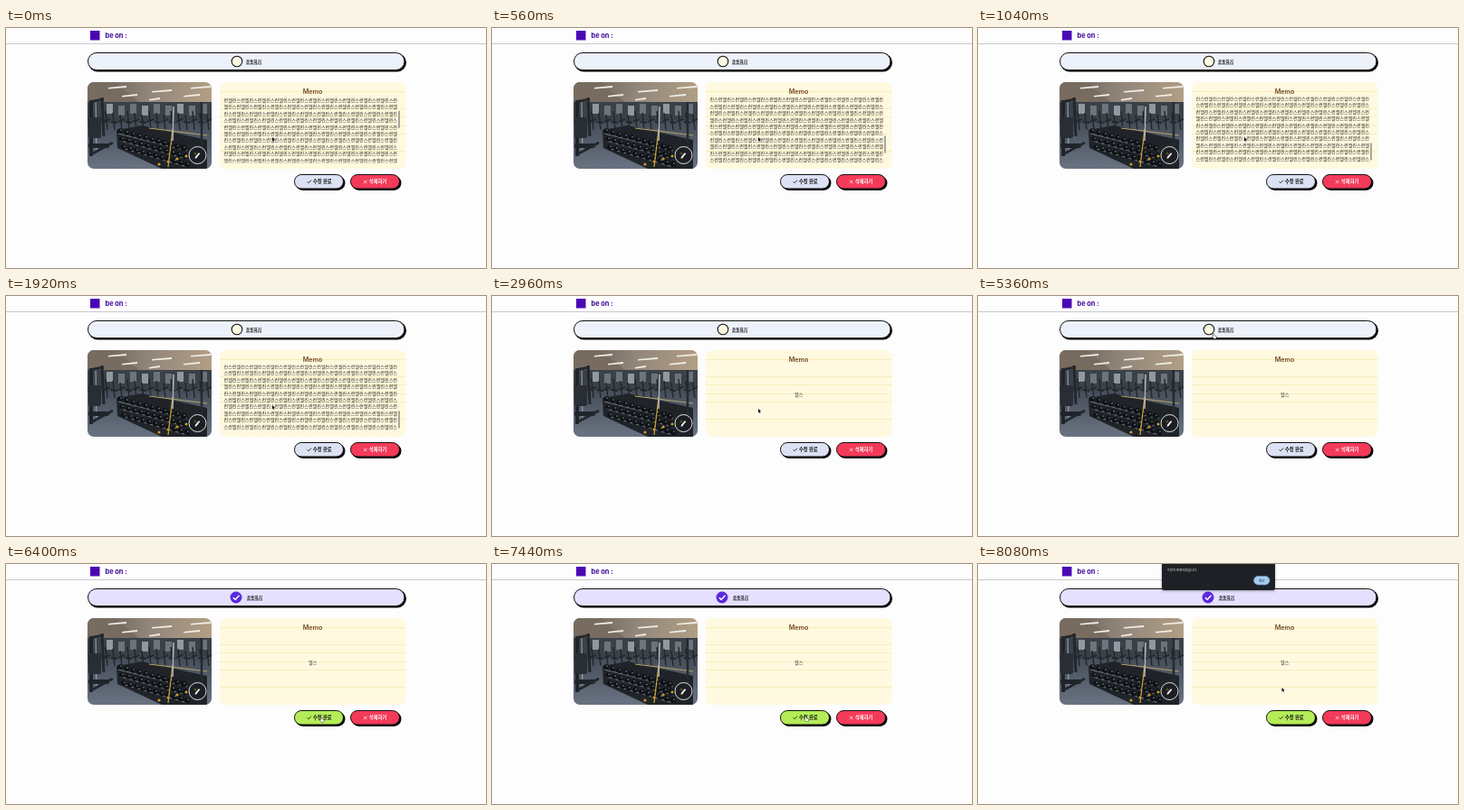
These frames come from a looping animation (530x266 px, 8.16 s). An HTML page with a canvas:

```html
<!DOCTYPE html>
<html lang="ko">
<head>
<meta charset="utf-8">
<title>Workout memo</title>
<style>
html, body { margin: 0; width: 100%; height: 100%; overflow: hidden; background: #fdfdfd; }
canvas { display: block; width: 530px; height: 266px; }
</style>
</head>
<body>
<canvas id="stage"></canvas>
<script>
const W = 530, H = 266, LOOP = 8160, STEP = 80;
const canvas = document.getElementById('stage');
const dpr = window.devicePixelRatio || 1;
canvas.width = W * dpr;
canvas.height = H * dpr;
const ctx = canvas.getContext('2d');
const SANS = '"Noto Sans CJK KR", "Noto Sans CJK", "Noto Sans", sans-serif';

const ROWS = 36, PER_ROW = 41, PITCH = 7.4;
const WORD = '런헬린스';
const rows = Array.from({ length: ROWS }, (_, r) =>
  Array.from({ length: PER_ROW }, (_, i) => WORD[(r * PER_ROW + i) % WORD.length]).join(''));

// Keys are [time, value, ...]; values ease between neighbouring keys.
const SCROLL = [[0, 60], [560, 164.1], [880, 195.1]];
const POINTER = [
  [0, 294, 121], [1920, 294, 121], [2800, 294, 125], [4240, 294, 125],
  [5200, 259, 42], [5680, 259, 42], [6160, 347, 170], [7920, 345, 169],
  [8080, 335.5, 137]
];
const TYPING = [[2480, ''], [2560, 'ㅎ'], [2640, '헤'], [2720, '헬'], [2800, '헬ㅅ'], [2880, '헬스']];
const CLEAR_AT = 2400, CHECK_AT = 5520, HOVER_AT = 6080, ALERT_AT = 7600;

function track(keys, t, ease = u => u) {
  for (let i = 1; i < keys.length; i++) {
    const [a, ...from] = keys[i - 1], [b, ...to] = keys[i];
    if (t <= b) {
      const u = ease((t - a) / (b - a));
      return from.map((v, k) => v + (to[k] - v) * u);
    }
  }
  return keys[keys.length - 1].slice(1);
}
const smooth = u => u * u * (3 - 2 * u);

function box(x, y, w, h, r, fill, stroke, lw = 1) {
  ctx.beginPath();
  ctx.roundRect(x, y, w, h, r);
  if (fill) { ctx.fillStyle = fill; ctx.fill(); }
  if (stroke) { ctx.strokeStyle = stroke; ctx.lineWidth = lw; ctx.stroke(); }
}
function disc(x, y, r, fill, stroke, lw = 1) {
  ctx.beginPath();
  ctx.arc(x, y, r, 0, Math.PI * 2);
  if (fill) { ctx.fillStyle = fill; ctx.fill(); }
  if (stroke) { ctx.strokeStyle = stroke; ctx.lineWidth = lw; ctx.stroke(); }
}
function line(color, lw, ...pts) {
  ctx.beginPath();
  for (let i = 0; i < pts.length; i += 2) ctx.lineTo(pts[i], pts[i + 1]);
  ctx.strokeStyle = color;
  ctx.lineWidth = lw;
  ctx.stroke();
}
function poly(fill, ...pts) {
  ctx.beginPath();
  for (let i = 0; i < pts.length; i += 2) ctx.lineTo(pts[i], pts[i + 1]);
  ctx.closePath();
  ctx.fillStyle = fill;
  ctx.fill();
}
function text(str, x, y, size, color, weight = 400, align = 'left', family = SANS) {
  ctx.font = `${weight} ${size}px ${family}`;
  ctx.textAlign = align;
  ctx.textBaseline = 'alphabetic';
  ctx.fillStyle = color;
  ctx.fillText(str, x, y);
}

function header() {
  box(93, 3, 10.5, 10.5, 0, '#4a08b4');
  text('be on :', 109.5, 11, 7.4, '#3f0a96', 700, 'left', 'Inter, sans-serif');
  ctx.fillStyle = '#c9c9cf';
  ctx.fillRect(0, 17, W, 1);
}

function goal(done) {
  box(91, 28, 351, 20.5, 10.2, '#000');
  box(90.5, 27.5, 349.5, 19, 9.5, done ? '#e5e0fe' : '#ecf1fa', '#111');
  if (done) {
    disc(254, 37, 6.5, '#5a2ade');
    line('#fff', 1.5, 250.8, 37.2, 253.2, 39.5, 257.5, 34.8);
  } else {
    disc(255, 37, 5.8, '#fdfce2', '#111', 1.1);
  }
  const x = done ? 266 : 265;
  text('운동하기', x, 38.9, 4.6, '#111', 700);
  line('#222', 0.6, x, 40, x + 17, 40);
}

function photo() {
  ctx.save();
  ctx.beginPath();
  ctx.roundRect(90, 60, 137, 96, 7);
  ctx.clip();

  const ceiling = ctx.createLinearGradient(90, 60, 227, 84);
  ceiling.addColorStop(0, '#625b54');
  ceiling.addColorStop(0.5, '#92867a');
  ceiling.addColorStop(1, '#b39f86');
  ctx.fillStyle = ceiling;
  ctx.fillRect(90, 60, 137, 28);
  poly('#786c60', 90, 60, 120, 60, 148, 83, 90, 83);
  ctx.fillStyle = '#3b4148';
  ctx.fillRect(90, 82, 137, 36);
  for (let i = 0; i < 9; i++) {
    ctx.fillStyle = i % 3 ? '#6d757c' : '#9199a0';
    ctx.fillRect(111 + i * 13, 84 + i % 2 * 2, 7, 11);
  }
  const floor = ctx.createLinearGradient(0, 104, 0, 156);
  floor.addColorStop(0, '#454d58');
  floor.addColorStop(1, '#697382');
  poly(floor, 90, 106, 227, 102, 227, 156, 90, 156);

  for (const [x, y, w] of [[128, 75, 17], [161, 70, 22], [196, 75, 18], [113, 66, 20], [204, 66, 22], [158, 79, 12]])
    poly('#f0eee4', x, y, x + w, y - 2, x + w, y, x, y + 1.6);

  for (let i = 0; i < 15; i++) {
    const x = 110 + i * 8;
    line('#22262b', 1.4, x, 92 + i % 3 * 2, x + 2, 113);
    line('#22262b', 1.8, x - 2, 104, x + 5, 101 + i % 2 * 4);
  }

  line('#20242a', 4, 94, 80, 94, 142);
  line('#23272d', 3, 106, 77, 108, 120);
  line('#a5acb3', 1, 99, 80, 100, 138);
  line('#24282e', 3, 92, 82, 108, 79);
  box(91, 99, 14, 23, 2, '#292e35');
  box(91, 128, 23, 5, 2, '#20242a');
  line('#22272d', 3, 94, 140, 118, 127);

  poly('#202429', 122, 113, 150, 108, 222, 124, 222, 156, 172, 156, 123, 133);
  for (let r = 0; r < 3; r++) {
    line('#737c85', 1, 124 + r * 2, 117 + r * 8, 200, 136 + r * 9);
    for (let i = 0; i < 11; i++) {
      const x = 126 + i * 7 + r * 2, y = 114 + i * 1.9 + r * 9;
      disc(x, y, 2.7 + i * 0.07, '#0f1216');
      disc(x + 1, y - 0.8, 0.8, '#858b90');
    }
  }
  line('#b6a56b', 1.2, 158, 111, 222, 119);
  line('#d0a63a', 1.2, 184, 112, 179, 154);
  line('#aeb4b7', 1.6, 185, 87, 184, 125);
  line('#252a30', 2.5, 216, 82, 216, 140);
  for (let i = 0; i < 5; i++) disc(169 + i * 10, 151 - i * 3, 1.6, '#c59b2e');

  disc(211.5, 141, 9.5, 'rgba(25,28,33,.65)', '#f4f4f4', 0.9);
  line('#fff', 1.7, 209.5, 143.6, 213.6, 138.7);
  poly('#fff', 208.5, 145, 209, 142.8, 210.5, 144.1);
  ctx.restore();
}

function memo(t) {
  box(236, 60, 205.5, 96, 7, '#fef9df');
  ctx.fillStyle = '#f8edbd';
  for (const y of [70, 89, 98, 108, 117, 136]) ctx.fillRect(236, y, 205.5, 1);
  text('Memo', 338.5, 73, 7.2, '#754a23', 600, 'center', 'Inter, sans-serif');

  if (t < CLEAR_AT) {
    const [scroll] = track(SCROLL, t);
    ctx.save();
    ctx.beginPath();
    ctx.rect(238, 76.5, 197, 73);
    ctx.clip();
    rows.forEach((row, r) => {
      const y = 80.8 + r * PITCH - scroll;
      if (y > 70 && y < 156) text(row, 240.5, y + 1.9, 5.08, '#27241e', 500);
    });
    box(433, 76 + scroll * 0.263, 2, 19.5, 1, '#a7a69f');
    ctx.restore();
  } else {
    let typed = '';
    for (const [at, s] of TYPING) if (t >= at) typed = s;
    text(typed, 338.7, 110.9, 5.08, '#39352c', 500, 'center');
  }
}

function button(x, fill, label, color, icon) {
  box(x + 1.5, 163.5, 55, 16.5, 8.2, '#000');
  box(x + 0.5, 162.5, 54, 15.5, 7.7, fill, '#111');
  if (icon === 'check') {
    line(color, 0.9, x + 14.6, 170.4, x + 16, 171.8, x + 19, 168.7);
  } else {
    line(color, 0.8, x + 15, 168.8, x + 18.4, 172.2);
    line(color, 0.8, x + 18.4, 168.8, x + 15, 172.2);
  }
  text(label, x + 21, 172.3, 5.3, color, 600);
}

function notice() {
  ctx.save();
  ctx.shadowColor = 'rgba(0,0,0,.35)';
  ctx.shadowBlur = 3 * dpr;
  ctx.shadowOffsetY = dpr;
  box(203, -4, 125, 33, 2, '#1d2125');
  ctx.restore();
  text('수정이 완료되었습니다.', 208.5, 7.5, 3.5, '#f0f0f0');
  box(304.5, 13.5, 17.5, 9.5, 4.7, '#a5cbee', '#6e9dc4', 0.6);
  text('확인', 313.2, 19.7, 3.6, '#17324b', 500, 'center');
}

function pointer(t) {
  const [x, y] = track(POINTER, t, smooth);
  const hand = (t >= 5040 && t < 5760) || (t >= HOVER_AT && t < ALERT_AT);
  ctx.save();
  ctx.translate(x, y);
  ctx.beginPath();
  const shape = hand
    ? [0.7, 0, 1.6, 0, 1.8, 2, 4.1, 2.7, 3.8, 5.2, 1.6, 5.3, -0.3, 3.3, 0.7, 3]
    : [0, 0, 0, 4.4, 1, 3.5, 1.8, 5.1, 2.6, 4.7, 1.8, 3.1, 3.2, 3];
  for (let i = 0; i < shape.length; i += 2) ctx.lineTo(shape[i], shape[i + 1]);
  ctx.closePath();
  ctx.lineWidth = 0.8;
  ctx.strokeStyle = hand ? '#111' : '#fff';
  ctx.fillStyle = hand ? '#fff' : '#111';
  ctx.stroke();
  ctx.fill();
  ctx.restore();
}

function draw(t) {
  ctx.setTransform(dpr, 0, 0, dpr, 0, 0);
  ctx.fillStyle = '#fdfdfd';
  ctx.fillRect(0, 0, W, H);
  header();
  goal(t >= CHECK_AT);
  photo();
  memo(t);
  button(318, t >= HOVER_AT ? '#b4ed58' : '#dce1f3', '수정 완료', '#171717', 'check');
  button(380, '#f43a59', '삭제하기', '#fff', 'cross');
  if (t >= ALERT_AT) notice();
  pointer(t);
}

const start = performance.now();
function tick() {
  const t = (performance.now() - start) % LOOP;
  draw(Math.floor(t / STEP) * STEP);
  requestAnimationFrame(tick);
}
tick();
</script>
</body>
</html>
```
